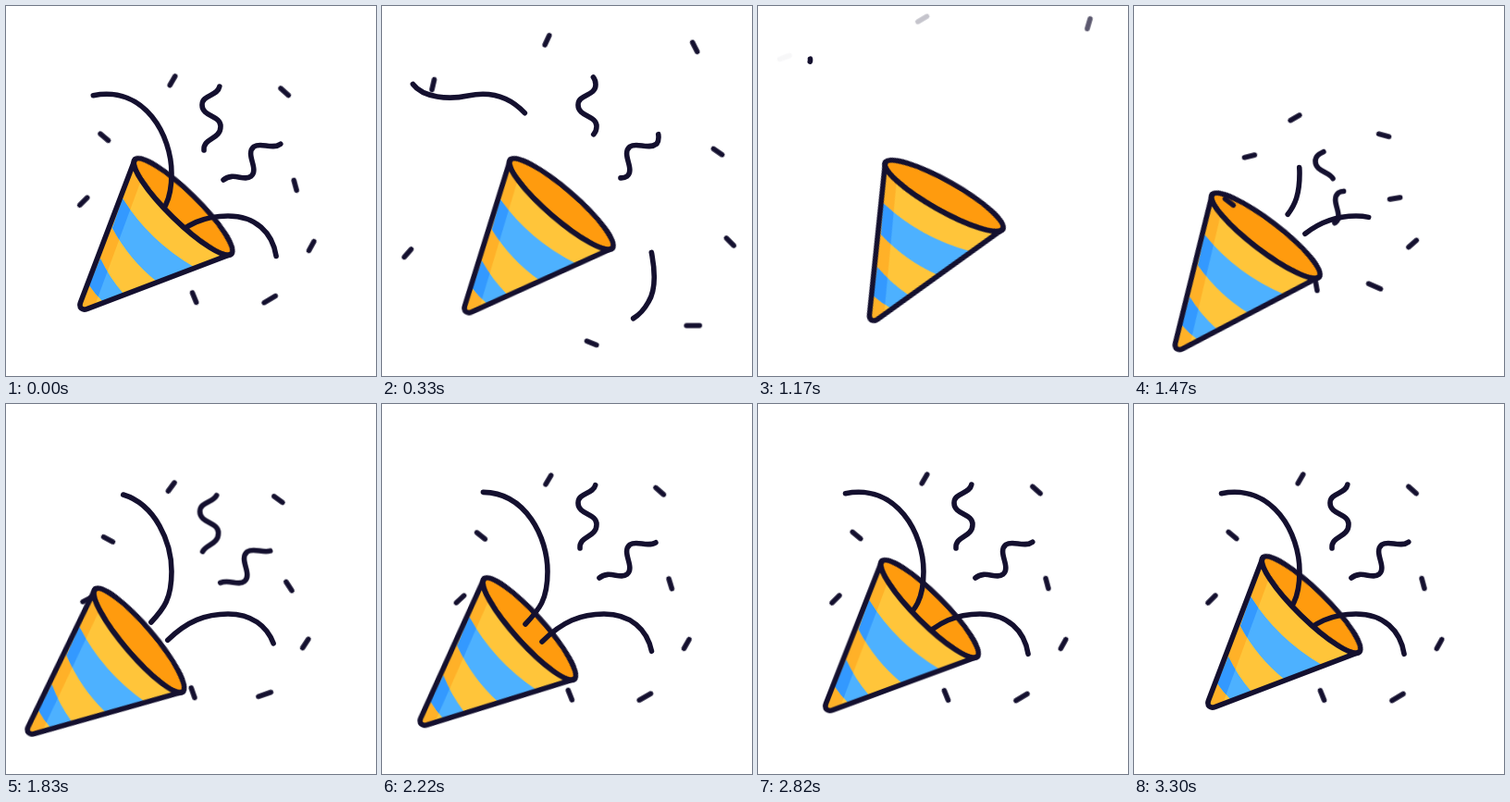
Recreate the animation shown at these times as an HTML page without scripts. Size 400 by 400 pixels, loop 5330 ms.

```html
<!DOCTYPE html>
<html lang="en">
<head>
<meta charset="utf-8">
<title>Party popper</title>
<style>
  @property --t { syntax: "<number>"; inherits: true; initial-value: 0; }

  html, body { margin: 0; width: 100%; height: 100%; overflow: hidden; background: #fff; }
  svg {
    display: block; width: 100%; height: 100%;
    animation: clock 5330ms linear infinite;
  }
  .ink { fill: none; stroke: #14102f; stroke-width: 5.6; stroke-linecap: round; stroke-linejoin: round; }

  /* --t is the elapsed time in ms; opacities are derived from it */
  @keyframes clock { from { --t: 0; } to { --t: 5330; } }

  .cone { transform-origin: 139px 165px; animation: recoil 5330ms linear infinite; }
  @keyframes recoil {
    0% { transform: translate(0, 0) rotate(0deg); animation-timing-function: cubic-bezier(.4, .1, .75, .8); }
    12.38% { transform: translate(-2px, 1px) rotate(-9deg); animation-timing-function: cubic-bezier(.3, .3, .6, 1); }
    23% { transform: translate(-2px, 3.5px) rotate(-15deg); animation-timing-function: cubic-bezier(.4, 0, .7, .85); }
    27.58% { transform: translate(-55px, 38px) rotate(-7deg); }
    29.3% { transform: translate(-57px, 41px) rotate(-1deg); }
    31.9% { transform: translate(-50px, 39px) rotate(4deg); }
    33.8% { transform: translate(-44px, 35px) rotate(5.2deg); }
    41.65% { transform: translate(-29px, 23px) rotate(3.6deg); }
    52.9% { transform: translate(-5.5px, 4px) rotate(.6deg); animation-timing-function: ease-out; }
    61.9%, 100% { transform: translate(0, 0) rotate(0deg); }
  }

  /* rest: x y a, flown out: x1 y1 a1, just fired: x3 y3 a3 */
  .bit {
    opacity: max((var(--end) - var(--t)) / 150, (var(--t) - 1310) / 20);
    animation: fly 5330ms linear infinite;
  }
  @keyframes fly {
    0% {
      transform: translate(var(--x), var(--y)) rotate(var(--a));
      animation-timing-function: cubic-bezier(.25, .5, .5, .93);
    }
    12.38% {
      transform: translate(var(--x1), var(--y1)) rotate(var(--a1));
      animation-timing-function: cubic-bezier(.3, .4, .6, 1);
    }
    24.2% {
      transform: translate(calc(var(--x1) * 1.16 - var(--x) * .16), calc(var(--y1) * 1.16 - var(--y) * .16)) rotate(calc(var(--a1) + 38deg));
      animation-timing-function: step-end;
    }
    24.3% { transform: translate(160px, 230px) rotate(var(--a3)); animation-timing-function: cubic-bezier(.3, .4, .7, .85); }
    27.58% {
      transform: translate(var(--x3), var(--y3)) rotate(var(--a3));
      animation-timing-function: cubic-bezier(.15, .6, .3, 1);
    }
    47%, 100% { transform: translate(var(--x), var(--y)) rotate(var(--a)); }
  }

  /* full: visible length at rest, all: whole path, from/to: trim when flown out,
     s/e: trim when just fired, late: length while settling, keep: last scrap */
  .streamer {
    --dx: 0px; --dy: 0px; --keep: 0px; --end: 1000; --to: var(--all);
    opacity: max(var(--end) - var(--t), var(--t) - 1320);
    animation: trim 5330ms linear infinite;
  }
  @keyframes trim {
    0% {
      stroke-dasharray: var(--full) 999px; stroke-dashoffset: 0px; transform: translate(0, 0);
      animation-timing-function: cubic-bezier(.3, .4, .5, .95);
    }
    12.38% {
      stroke-dasharray: calc(var(--to) - var(--from)) 999px;
      stroke-dashoffset: calc(0px - var(--from)); transform: translate(0, 0);
    }
    18.8% {
      stroke-dasharray: var(--keep) 999px;
      stroke-dashoffset: calc(var(--keep) - var(--all)); transform: translate(0, 0);
    }
    22.6% {
      stroke-dasharray: 0px 999px; stroke-dashoffset: calc(0px - var(--all)); transform: translate(0, 0);
      animation-timing-function: step-end;
    }
    24.7% {
      stroke-dasharray: 0px 999px; stroke-dashoffset: calc(0px - var(--s));
      transform: translate(calc(var(--dx) * 1.8), calc(var(--dy) * 1.8));
    }
    27.58% {
      stroke-dasharray: calc(var(--e) - var(--s)) 999px;
      stroke-dashoffset: calc(0px - var(--s)); transform: translate(var(--dx), var(--dy));
      animation-timing-function: cubic-bezier(.2, .6, .4, 1);
    }
    41.65% {
      stroke-dasharray: var(--late) 999px; stroke-dashoffset: 0px; transform: translate(0, 0);
      animation-timing-function: ease-out;
    }
    51%, 100% { stroke-dasharray: var(--full) 999px; stroke-dashoffset: 0px; transform: translate(0, 0); }
  }
</style>
</head>
<body>
<svg viewBox="0 0 400 400">
  <defs>
    <path id="body" d="M139.300 165.900L80.500 320.500C78.500 326.500 82.500 329.500 88 327.300L243.700 268.100A73 16 44.400 0 1 139.300 165.900Z"/>
    <path id="stripes" d="M126 208Q155 254 203 282L163 298Q133 274 115 240ZM102 273Q112 294 127 311L105 320Q96 311 90 302Z"/>
    <path id="shade" d="M139 165L148 183L96 324L76 332Z"/>
    <clipPath id="inside"><use href="#body"/></clipPath>
    <clipPath id="striped"><use href="#stripes"/></clipPath>
    <path id="dash" d="M-5.600 0H5.600"/>
  </defs>

  <g class="cone">
    <ellipse class="ink" cx="191.500" cy="217" rx="73" ry="16" transform="rotate(44.400 191.500 217)" style="fill:#ff9b0e"/>
  </g>

  <g class="ink">
    <use href="#dash" class="bit" style="--x:180px;--y:81px;--a:-60deg;--x1:178px;--y1:23px;--a1:-67deg;--x3:174px;--y3:121px;--a3:-30deg;--end:1208"/>
    <use href="#dash" class="bit" style="--x:301px;--y:93px;--a:42deg;--x1:350px;--y1:29px;--a1:70deg;--x3:270px;--y3:140px;--a3:15deg;--end:1275"/>
    <use href="#dash" class="bit" style="--x:312.5px;--y:194px;--a:75deg;--x1:379px;--y1:146px;--a1:22deg;--x3:282px;--y3:208px;--a3:-10deg;--end:900"/>
    <use href="#dash" class="bit" style="--x:330px;--y:259.5px;--a:119deg;--x1:391px;--y1:253.5px;--a1:22deg;--x3:301px;--y3:257px;--a3:139deg;--end:788"/>
    <path d="M-7 0H7" class="bit" style="--x:285px;--y:317px;--a:-31deg;--x1:352.5px;--y1:354.5px;--a1:9deg;--x3:260px;--y3:303px;--a3:24deg;--end:900"/>
    <use href="#dash" class="bit" style="--x:203.5px;--y:315px;--a:68deg;--x1:234px;--y1:380px;--a1:8deg;--x3:197px;--y3:302px;--a3:80deg;--end:900"/>
    <use href="#dash" class="bit" style="--x:84px;--y:211px;--a:-45deg;--x1:10px;--y1:285px;--a1:-50deg;--x3:103px;--y3:212px;--a3:38deg;--end:698"/>
    <use href="#dash" class="bit" style="--x:106.5px;--y:142px;--a:40deg;--x1:39px;--y1:67px;--a1:123deg;--x3:125px;--y3:162.5px;--a3:-14deg;--end:1176"/>

    <path class="streamer" d="M155 238C170 222 179 212 179 181C179 140 150 85 93 97C65 103 24 97 29 64C32 42 66 50 54 64"
      style="--full:201px;--all:328px;--from:187px;--to:291px;--s:17px;--e:70px;--late:186px;--keep:18px;--end:1200"/>
    <path class="streamer" d="M173 257C195 235 215 227 240 227C270 227 288 245 292 270C297 298 293 312 288 320C278 338 262 346 245 341"
      style="--full:150px;--all:254px;--from:202px;--s:16px;--e:89px;--late:147px"/>
    <path class="streamer" d="M214 156C213 142 232 145 232 130C232 118 212 120 212 107C212 95 231 98 231 85C231 78 227 75 223 73"
      style="--full:94.5px;--all:109px;--from:33px;--s:38px;--e:80px;--late:94px;--dx:-16px;--dy:61px"/>
    <path class="streamer" d="M235 188C246 179 257 190 265 184C274 176 258 160 268 152C276 147 288 156 297 149C300 145 299 139 298 135"
      style="--full:95px;--all:110px;--from:33px;--s:30px;--e:71px;--late:94px;--dx:-47px;--dy:50px"/>
  </g>

  <g class="cone">
    <g clip-path="url(#inside)">
      <use href="#body" fill="#ffc53a"/>
      <use href="#shade" fill="#ffb128"/>
      <use href="#stripes" fill="#4db1ff"/>
      <g clip-path="url(#striped)"><use href="#shade" fill="#3399ff"/></g>
    </g>
    <use href="#body" class="ink"/>
  </g>
</svg>
</body>
</html>
```
